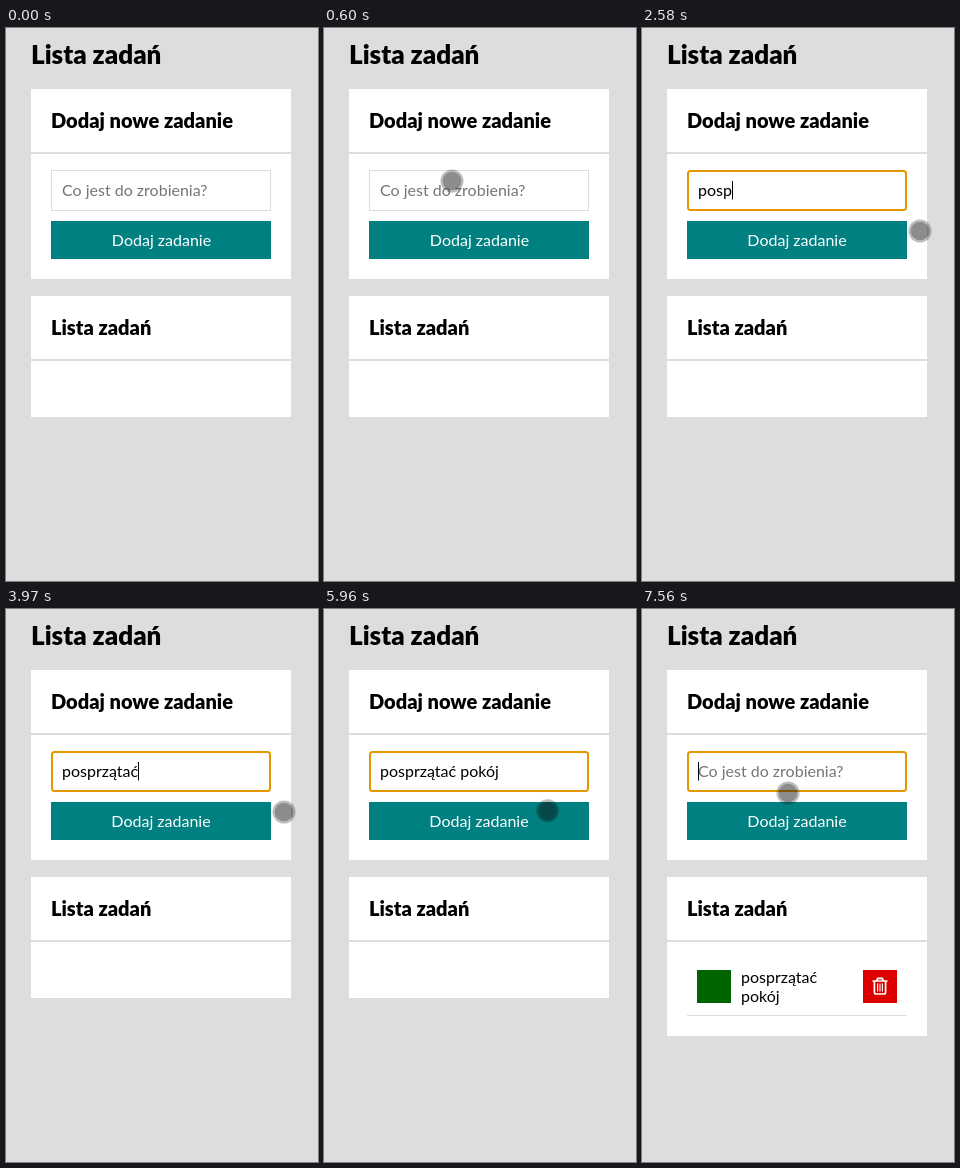
An HTML page that plays this animation: 312 by 553 pixels, repeating every 8 s.

```html
<!DOCTYPE html>
<html lang="pl">
<head>
<meta charset="utf-8">
<title>Lista zadań</title>
<style>
  html, body { margin: 0; width: 100%; height: 100%; overflow: hidden; background: #ddd; }
  svg { display: block; width: 100%; height: 100%; }
  text { font: 16px Lato, sans-serif; white-space: pre; }
  .title { font-size: 26px; font-weight: 900; }
  .heading { font-size: 20px; font-weight: 900; }
  .card { fill: #fff; }
  .line { fill: #ddd; }
</style>
</head>
<body>
<svg viewBox="0 0 312 553">
  <rect width="312" height="553" fill="#ddd"/>
  <text class="title" x="25" y="36">Lista zadań</text>

  <rect class="card" x="25" y="61" width="260" height="190"/>
  <rect class="line" x="25" y="124" width="260" height="2"/>
  <text class="heading" x="45" y="100">Dodaj nowe zadanie</text>
  <rect id="field" fill="#fff"/>
  <text id="placeholder" x="56" y="168" fill="#757575">Co jest do zrobienia?</text>
  <text id="typed" x="56" y="168"></text>
  <rect id="caret" y="153" width="1" height="18.5"/>
  <rect x="45" y="193" width="220" height="38" fill="#008080"/>
  <text id="label" y="217.5" fill="#fff" text-anchor="middle">Dodaj zadanie</text>

  <rect id="list" class="card" x="25" y="268" width="260"/>
  <rect class="line" x="25" y="331" width="260" height="2"/>
  <text class="heading" x="45" y="307">Lista zadań</text>
  <g id="item">
    <rect x="55" y="361" width="34" height="33" fill="#006400"/>
    <text x="99" y="374">posprzątać</text>
    <text x="99" y="393">pokój</text>
    <rect x="221" y="361" width="34" height="33" fill="#dc0000"/>
    <g fill="none" stroke="#fff" stroke-width="1.7">
      <path d="M230.5 372h15M234.5 372l1.3-2.6h4.4l1.3 2.6M232.4 372v11.2q0 1.8 1.8 1.8h7.6q1.8 0 1.8-1.8V372"/>
      <path d="M235.6 374.5v8M238 374.5v8M240.4 374.5v8" stroke-width="1.1"/>
    </g>
    <rect class="line" x="45" y="406" width="220" height="1"/>
  </g>

  <g id="pointer" fill="#101010">
    <circle r="11.5" fill-opacity=".27"/>
    <circle r="9.3" fill-opacity=".29"/>
  </g>
</svg>
<script>
const LOOP = 8000, BLINK = 530;
const FOCUS = 850, SUBMIT = 6500;
const TASK = "posprzątać pokój";
const KEY_TIMES = [1850, 2110, 2310, 2580, 2710, 2910, 3240, 3510, 3710, 3970,
                   4110, 4240, 4440, 4570, 4900, 5100];
const CARET_RESETS = [FOCUS, ...KEY_TIMES, 6560, 7560];

// Stepped pointer moves along cubic curves; power sets the ease-out.
const MOVES = [
  { start: 70, end: 600, steps: 9, power: 1, path: [[300, 751], [310, 0], [230, 70], [128, 153]] },
  { start: 790, end: 990, steps: 4, power: 2, path: [[128, 153], [180, 135], [250, 160], [278, 203]] },
  { start: 5960, end: 6160, steps: 4, power: 3, path: line([278, 203], [184, 201]) },
  { start: 6300, end: 6300, steps: 1, power: 1, path: line([184, 201], [184, 210]) },
  { start: 7090, end: 7360, steps: 5, power: 2, path: line([184, 210], [147, 185]) },
  { start: 7560, end: 7560, steps: 1, power: 1, path: line([147, 185], [146, 184]) },
];

const el = id => document.getElementById(id);
const show = (id, on) => el(id).setAttribute("visibility", on ? "visible" : "hidden");
const set = (id, attrs) => {
  for (const name in attrs) el(id).setAttribute(name, attrs[name]);
};

function line(a, b) {
  const at = k => a.map((v, i) => v + (b[i] - v) * k);
  return [a, at(1 / 3), at(2 / 3), b];
}

function bezier([a, b, c, d], k) {
  const m = 1 - k;
  return a.map((v, i) =>
    m * m * m * v + 3 * m * m * k * b[i] + 3 * m * k * k * c[i] + k * k * k * d[i]);
}

function pointerAt(t) {
  const move = MOVES.findLast(m => t >= m.start);
  if (!move) return null;
  const span = Math.max(1, move.end - move.start);
  const step = Math.floor((t - move.start) / span * (move.steps - 1) + 1e-6) + 1;
  const progress = Math.min(1, step / move.steps);
  return bezier(move.path, 1 - (1 - progress) ** move.power);
}

function caretOn(t) {
  const reset = CARET_RESETS.findLast(time => t >= time);
  return reset !== undefined && Math.floor((t - reset) / BLINK) % 2 === 0;
}

function draw(t) {
  const focused = t >= FOCUS, added = t >= SUBMIT;
  const text = added ? "" : TASK.slice(0, KEY_TIMES.filter(time => t >= time).length);

  set("field", focused
    ? { x: 46, y: 143, width: 218, height: 39, rx: 2.5, stroke: "#e59700", "stroke-width": 2 }
    : { x: 45.5, y: 142.5, width: 219, height: 40, rx: 0, stroke: "#ddd", "stroke-width": 1 });
  set("label", { x: focused ? 155 : 155.5 });

  el("typed").textContent = text;
  show("placeholder", !text);
  set("caret", { x: 56 + (text ? Math.round(el("typed").getComputedTextLength()) : 0) });
  show("caret", caretOn(t));

  set("list", { height: added ? 159 : 121 });
  show("item", added);

  const pointer = pointerAt(t);
  show("pointer", pointer);
  if (pointer) set("pointer", { transform: `translate(${pointer})` });
}

function frame() {
  draw(performance.now() % LOOP);
  requestAnimationFrame(frame);
}
frame();
</script>
</body>
</html>
```
